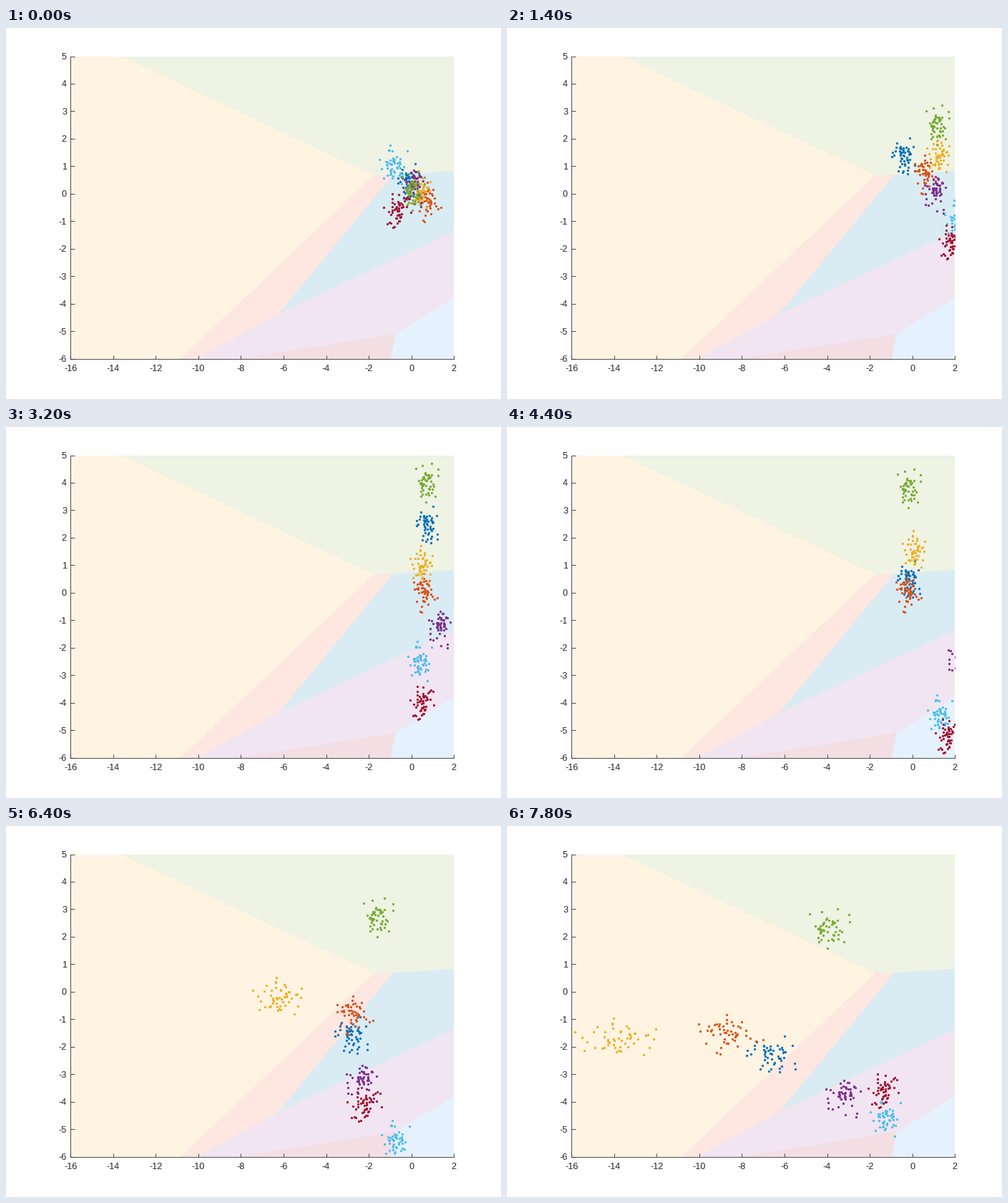
A matplotlib script for the animation above (8000 ms loop, 692 by 519 pixels).

```python
import numpy as np
import matplotlib.pyplot as plt
from matplotlib.animation import FuncAnimation

W, H, DPI = 692, 519, 64
PX = 72 / DPI                      # one pixel in points
LEFT, RIGHT, TOP, BOTTOM = 90.2, 626.2, 39.5, 462.8
INK = "#262626"
FRAMES, STEP_MS, DOTS = 40, 200, 50

# Way points of each cluster centre, reached at the key steps
KEYS = np.array([0, 7, 16, 27, 32, 39])
PATHS = {
    "#0072bd": "-.1,.4  -.4,1.35  .75,2.45  -1.45,-1.25  -2.8,-1.6  -6.6,-2.3",
    "#d95319": ".75,-.25  .6,.75  .6,.05  -1.35,-.1  -2.75,-.8  -8.7,-1.5",
    "#edb120": ".4,.1  1.25,1.4  .5,1  -1.7,1.4  -6.2,-.2  -13.8,-1.7",
    "#7e2f8e": ".1,.35  1.1,.1  1.35,-1.2  1.45,-3  -2.3,-3.2  -3.2,-3.75",
    "#77ac30": ".05,.1  1.15,2.5  .7,4  -1,3.25  -1.6,2.7  -3.95,2.3",
    "#4dbeee": "-.85,1.05  2.1,-.95  .4,-2.5  1.4,-5.6  -.75,-5.4  -1.25,-4.55",
    "#a2142f": "-.65,-.6  1.8,-1.75  .5,-4  1.4,-5.35  -2.2,-4.1  -1.35,-3.6",
}


def parse(path):
    return [[float(v) for v in point.split(",")] for point in path.split()]


def spline(points, step):
    """Cubic Hermite curve through the way points."""
    slope = np.gradient(points, KEYS, axis=0)
    k = min(np.searchsorted(KEYS, step, side="right") - 1, len(KEYS) - 2)
    h = KEYS[k + 1] - KEYS[k]
    u = (step - KEYS[k]) / h
    ease = u * u * (3 - 2 * u)
    return ((1 - ease) * points[k] + ease * points[k + 1]
            + h * u * (1 - u) * ((1 - u) * slope[k] - u * slope[k + 1]))


def make_offsets(count):
    z = np.random.default_rng(12).standard_normal((count, 2, DOTS))
    z -= z.mean(axis=2, keepdims=True)
    return z / z.std(axis=2, keepdims=True)


def label(x, y, value, ha):
    fig.text(x / W, 1 - y / H, str(value), ha=ha, va="baseline",
             family="Liberation Sans", size=12.6 * PX, color=INK)


def region(color, *corners):
    """Filled polygon with its corners in pixels from the top left."""
    points = [(x, H - y) for x, y in corners]
    patch = plt.Polygon(points, facecolor=color, edgecolor=color,
                        linewidth=0.4 * PX, zorder=0, transform=None)
    ax.add_patch(patch)
    patch.set_clip_path(ax.patch)


fig = plt.figure(figsize=(W / DPI, H / DPI), dpi=DPI, facecolor="white")
ax = fig.add_axes([LEFT / W, 1 - BOTTOM / H,
                   (RIGHT - LEFT) / W, (BOTTOM - TOP) / H],
                  facecolor="#fff3e2")
ax.set(xlim=(-16, 2), ylim=(-6, 5),
       xticks=range(-16, 3, 2), yticks=range(-6, 6))
ax.tick_params(direction="in", length=5.5 * PX, width=0.8 * PX, color=INK,
               labelleft=False, labelbottom=False)
for side in ("top", "right"):
    ax.spines[side].set_visible(False)
for side in ("left", "bottom"):
    ax.spines[side].set(color=INK, linewidth=0.8 * PX)

# Corners where three regions meet
a, b, c, d = (515, 206), (541, 206), (381, 400), (545, 428)
upper, middle, lower = (627, 200), (627, 284), (627, 377)
region("#eef3e4", (160, 39), (627, 39), upper, b, a)
region("#fee6e1", a, b, c, (267, 463), (244, 463))
region("#d9ebf3", b, upper, middle, c)
region("#f1e5f2", middle, c, (267, 463), (325, 463), d, lower)
region("#f3dee4", (325, 463), d, (538, 463))
region("#e5f1fd", d, lower, (627, 463), (538, 463))

for value in range(-16, 3, 2):
    label(LEFT + (value + 16) * (RIGHT - LEFT) / 18, 479.5, value, "center")
for value in range(-6, 6):
    label(85, TOP + (5 - value) * (BOTTOM - TOP) / 11 + 4.5, value, "right")

paths = [np.array(parse(path)) for path in PATHS.values()]
offsets = make_offsets(len(paths))
clouds = [ax.plot([], [], "o", color=color, markersize=3.3 * PX,
                  markeredgewidth=0, zorder=3)[0] for color in PATHS]


def update(step):
    for cloud, path, (dx, dy) in zip(clouds, paths, offsets):
        x, y = spline(path, step)
        wide = 0.23 + 0.045 * max(0, -x)   # clouds widen to the left
        cloud.set_data(x + wide * dx, y + 0.3 * dy)
    return clouds


anim = FuncAnimation(fig, update, frames=FRAMES, interval=STEP_MS,
                     init_func=lambda: update(0), repeat=True,
                     repeat_delay=0, blit=False)
plt.show()
```
